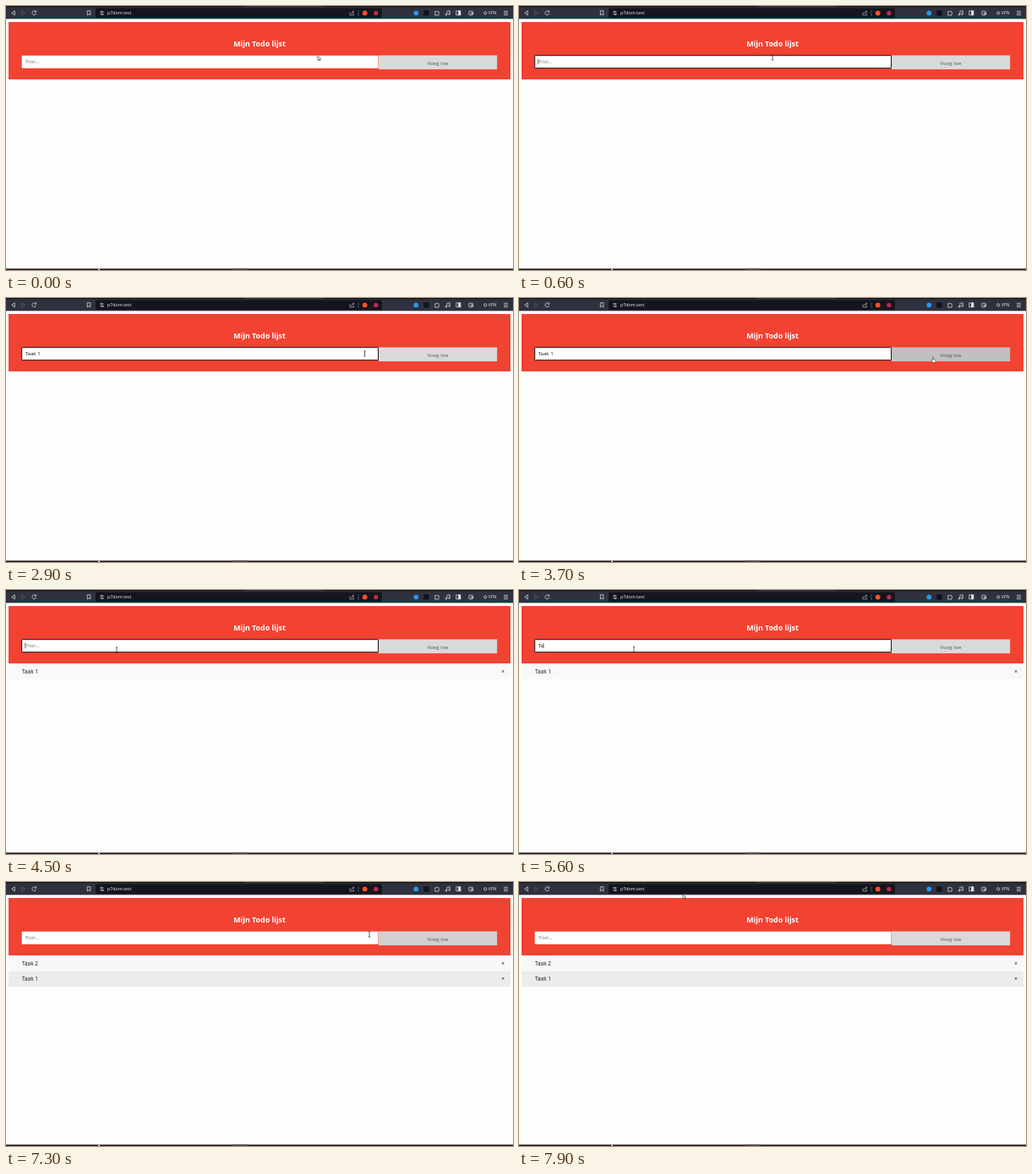
These frames come from a looping animation (600 px wide and 313 px high, 8 s). An HTML page:

```html
<!DOCTYPE html>
<html lang="nl">
<head>
<meta charset="utf-8">
<title>Todo</title>
<style>
  html, body { margin: 0; width: 100%; height: 100%; overflow: hidden; background: #fdfdfd; }
  svg { display: block; width: 600px; height: 313px; font: 6.1px "Open Sans", "Noto Sans", sans-serif; }
  .icons { fill: none; stroke: #d3d3da; stroke-width: .8; }
  .row text { font-size: 6.4px; fill: #111; }
</style>
</head>
<body>
<svg viewBox="0 0 600 313">
  <rect width="600" height="313" fill="#fdfdfd"/>

  <!-- browser bar -->
  <rect width="600" height="15.3" fill="#30313e"/>
  <rect width="600" height="1.2" fill="#13141c"/>
  <rect x="282" width="94" height="1.2" fill="#30313e"/>
  <rect x="106" y="2.5" width="339" height="11.5" rx="1.5" fill="#14151d"/>
  <g class="icons">
    <path d="M10.3 5.8V10.8L6.7 8.3Z"/>
    <path d="M18.7 5.8V10.8L22.3 8.3Z" stroke="#5b5c68"/>
    <path d="M35.3 6.8A2.4 2.4 0 1 0 35.6 9M35.7 5.4V7.2H33.8"/>
    <path d="M96.3 5.7H99.9V11L98.1 9.4L96.3 11Z"/>
    <path d="M111 7H112.4M114 7H116M111 9.8H113M114.8 9.8H116" stroke="#a9a9b1"/>
    <circle cx="113.2" cy="7" r=".8"/><circle cx="114" cy="9.8" r=".8"/>
    <path d="M407 7.5V10.8H411.5V9M408.7 9Q409 7 411.6 6.8M410.3 5.5L411.8 6.8L410.3 8.1" stroke="#a9a9b1"/>
    <path d="M417 5V12" stroke="#777783" stroke-width=".6"/>
    <path d="M507.6 6.7H509.2A.9 .9 0 0 1 510.9 6.7H512V8.1A.9 .9 0 0 1 512 9.8V11H507.6V9.8A.9 .9 0 0 0 507.6 8.1Z"/>
    <path d="M521.8 10V6.4L525.3 5.7V9.3"/>
    <circle cx="521" cy="10.2" r=".9"/><circle cx="524.5" cy="9.5" r=".9"/>
    <rect x="532.8" y="5.9" width="5" height="4.8"/>
    <rect x="535.5" y="5.9" width="2.3" height="4.8" fill="#eee"/>
    <rect x="547.8" y="6.2" width="4.6" height="4.6" rx=".7"/><path d="M550.3 8.2H552.8V9.4H550.3Z"/>
    <circle cx="567.2" cy="8.3" r="1.6"/>
    <path d="M589 6.3H594M589 8.4H594M589 10.5H594"/>
  </g>
  <circle cx="424.7" cy="8.4" r="2.9" fill="#f0522d"/>
  <circle cx="437.8" cy="8.4" r="2.6" fill="#c12b55"/>
  <circle cx="485.3" cy="8.4" r="2.9" fill="#2496ee"/>
  <rect x="494.3" y="5.3" width="6.2" height="6.2" fill="#11131a"/>
  <text x="120" y="10.3" font-size="5.3" fill="#f0f0f3">p7dom.test</text>
  <text x="570.7" y="10.1" font-size="5" fill="#e6e6ea">VPN</text>

  <!-- page -->
  <rect x="3" y="19" width="594" height="68" fill="#f24232"/>
  <text x="300" y="48" text-anchor="middle" font-size="8.9" font-weight="700" fill="#fff">Mijn Todo lijst</text>
  <rect id="field" x="18.7" y="58.7" width="421.8" height="15" rx=".8" fill="#fff"/>
  <text id="typed" x="22.7" y="68.3" xml:space="preserve"></text>
  <path id="caret" stroke="#111" stroke-width=".6"/>
  <rect id="button" x="441" y="58.5" width="140.2" height="16.6"/>
  <text x="511" y="69.6" text-anchor="middle" fill="#555">Voeg toe</text>
  <g class="row" id="row1">
    <rect x="3" y="87" width="594" height="18.5"/>
    <text x="19" y="98.9">Taak 1</text><text x="588.2" y="98.9" text-anchor="middle">×</text>
  </g>
  <g class="row" id="row2">
    <rect x="3" y="87" width="594" height="18.6" fill="#f8f8f8"/>
    <text x="19" y="98.9">Taak 2</text><text x="588.2" y="98.9" text-anchor="middle">×</text>
  </g>

  <!-- taskbar edge -->
  <rect y="311.4" width="600" height="1.6" fill="#17181c"/>
  <rect x="109" y="311.4" width="2" height="1.6" fill="#d0d0d0"/>
  <rect x="268" y="311.4" width="18" height="1.6" fill="#4a4b50"/>

  <path id="cursor" stroke-linejoin="round"/>
</svg>
<script>
const $ = id => document.getElementById(id);
const LOOP = 8000, STEP = 100;

// [time, x, y]
const pointer = [
  [0, 369, 59.2], [100, 369, 59.2], [300, 335, 62], [600, 300, 61], [2400, 300, 61],
  [2700, 365, 63], [3100, 484, 69], [3600, 490, 70], [3900, 490, 70],
  [4100, 390, 72], [4400, 131, 71], [5000, 131, 71], [5300, 136, 70.5], [6200, 136, 70.5],
  [6700, 490, 71], [6900, 498, 74.3], [7100, 498, 74.3],
  [7300, 430, 62], [7600, 215, 17], [7800, 194, 14.5]
];
const hover = [[3000, 0], [3300, 1], [3900, 1], [4200, 0], [6600, 0], [6900, .8], [7100, 1], [7400, 0]];

const sessions = [
  { focus: 600, blur: 3900, text: 'Taak 1', keys: [1300, 1500, 1700, 1900, 2000, 2100] },
  { focus: 4400, blur: 7100, text: 'Taak 2', keys: [5300, 5500, 5800, 6000, 6200, 6500] }
];

const shapes = {
  arrow: { d: 'M0 0V5.2L1.2 4.1L2 5.8L2.8 5.4L2 3.8H3.6Z', fill: '#fff', stroke: '#333', width: .6 },
  beam: { d: 'M-1.1 -3H1.1M0 -3V3M-1.1 3H1.1', fill: 'none', stroke: '#222', width: .7 },
  hand: { d: 'M-.5 .3Q0 -.4 .5 .3V2.6L2.8 3.2Q3.3 3.5 3 4.6L2.4 6.6H-.3L-2 4.2Q-1.8 3.3 -.5 4Z', fill: '#fff', stroke: '#333', width: .55 }
};

function sample(track, t) {
  const next = track.findIndex(key => key[0] > t);
  if (next < 0) return track.at(-1).slice(1);
  if (next === 0) return track[0].slice(1);
  const a = track[next - 1], b = track[next], k = (t - a[0]) / (b[0] - a[0]);
  return a.slice(1).map((v, i) => v + (b[i + 1] - v) * k);
}

function drawField(t) {
  const active = sessions.find(s => t >= s.focus && t < s.blur);
  const count = active ? active.keys.filter(k => k <= t).length : 0;
  const typed = $('typed');
  typed.textContent = count ? active.text.slice(0, count) : 'Titel...';
  typed.setAttribute('fill', count ? '#111' : '#757575');
  $('field').setAttribute('stroke', active ? '#151515' : 'none');
  const lastKey = active && (count ? active.keys[count - 1] : active.focus);
  const caretOn = active && (t - lastKey) % 1000 < 500;
  const x = 22.7 + (count ? typed.getComputedTextLength() : 0);
  $('caret').setAttribute('d', caretOn ? `M${x} 62.8V69.3` : '');
}

function drawPointer(t) {
  const [x, y] = sample(pointer, t);
  const inside = y > 58 && y < 75;
  const kind = !inside || t < 200 ? 'arrow' : x > 441 ? 'hand' : x > 18 ? 'beam' : 'arrow';
  const { d, fill, stroke, width } = shapes[kind], cursor = $('cursor');
  for (const [name, value] of Object.entries({
    d, fill, stroke, 'stroke-width': width, transform: `translate(${x} ${y})`
  })) cursor.setAttribute(name, value);
}

function draw(t) {
  drawField(t);
  drawPointer(t);
  const grey = Math.round(217 - 25 * sample(hover, t)[0]);
  $('button').setAttribute('fill', `rgb(${grey},${grey},${grey})`);
  const [first, second] = sessions.map(s => t >= s.blur + STEP);
  $('row1').style.display = first ? '' : 'none';
  $('row2').style.display = second ? '' : 'none';
  $('row1').setAttribute('transform', `translate(0 ${second ? 18.6 : 0})`);
  $('row1').firstElementChild.setAttribute('fill', second ? '#ececec' : '#f8f8f8');
}

const start = performance.now();
function tick() {
  const t = (performance.now() - start) % LOOP;
  draw(Math.floor(t / STEP) * STEP);
  requestAnimationFrame(tick);
}
tick();
</script>
</body>
</html>
```
